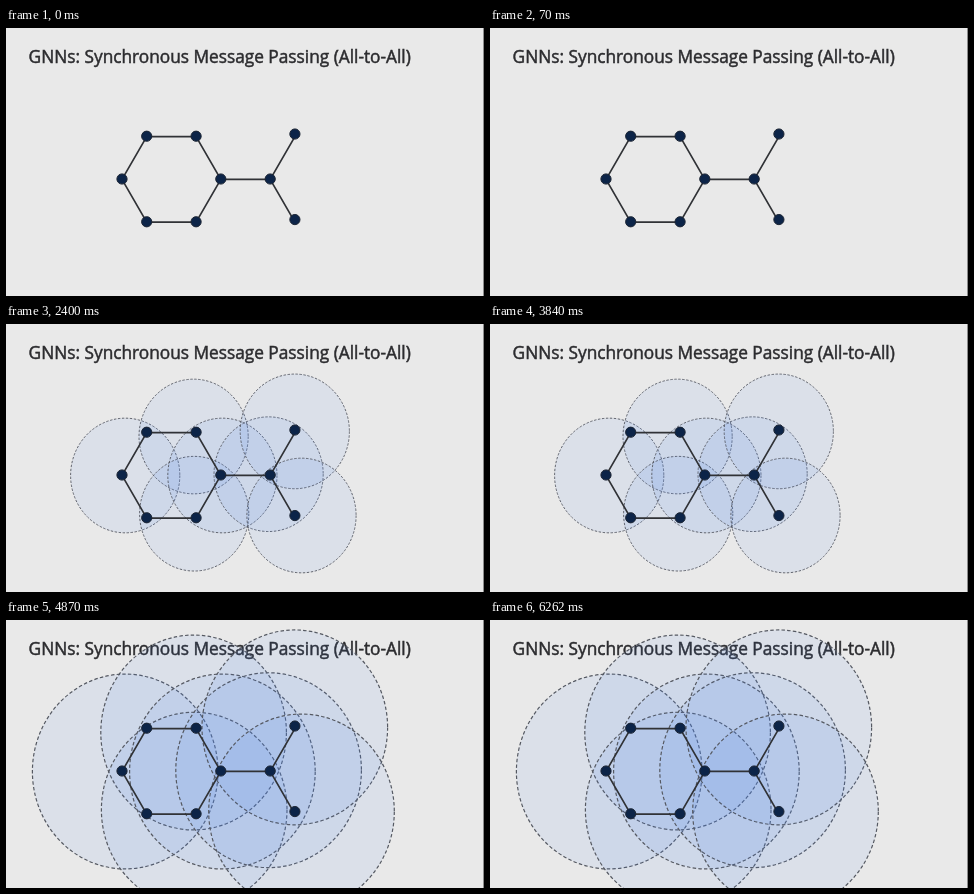
Animation, 478 px wide and 268 px high, one loop 7.19 s. Source, as an HTML page with a canvas:

```html
<!DOCTYPE html>
<html lang="en">
<head>
<meta charset="utf-8">
<title>Synchronous message passing</title>
<style>
  html, body { margin: 0; width: 100%; height: 100%; overflow: hidden; background: #e9e9e9; }
  canvas { display: block; width: 478px; height: 268px; }
</style>
</head>
<body>
<canvas id="stage"></canvas>
<script>
const W = 478, H = 268, LOOP = 7190, ROUND = 2400;
const AXIS = 151.4, BOND = 49.4;
const canvas = document.getElementById('stage');
const ctx = canvas.getContext('2d');
const scale = window.devicePixelRatio || 1;
canvas.width = W * scale;
canvas.height = H * scale;

// Point one bond away from (x, y), in steps of 60 degrees
function step(x, y, turns) {
  const a = turns * Math.PI / 3;
  return { x: x + BOND * Math.cos(a), y: y + BOND * Math.sin(a) };
}

const ring = Array.from({ length: 6 }, (_, i) => step(165.4, AXIS, i));
const hub = step(ring[0].x, AXIS, 0);
const tips = [-1, 1].map(turn => step(hub.x, hub.y, turn));
const bonds = [
  ...ring.map((atom, i) => [atom, ring[(i + 1) % 6]]),
  [ring[0], hub],
  ...tips.map(tip => [hub, tip])
];

// Centres of the message fields
const fields = [
  [119.2, 151.5], [187.6, 112.5], [188.2, 189.7], [216.4, 151.5],
  [262.6, 150.2], [288.8, 107.4], [295.5, 191.5]
];

function drawTitle() {
  const title = 'GNNs: Synchronous Message Passing (All-to-All)';
  ctx.font = '17.25px "Open Sans", "Noto Sans", sans-serif';
  ctx.fillStyle = ctx.strokeStyle = '#2c2c2f';
  ctx.lineWidth = 0.5;
  ctx.fillText(title, 22.6, 34.6);
  ctx.strokeText(title, 22.6, 34.6);
}

// The reach grows by the same amount in every round
function drawFields(round) {
  const reach = 16.4 + 38.2 * round;
  ctx.fillStyle = 'rgba(70, 125, 225, 0.085)';
  ctx.strokeStyle = '#555962';
  ctx.lineWidth = 0.6 + 0.3 * round;
  ctx.setLineDash([1.3 + 1.1 * round, 1 + 0.6 * round]);
  for (const [x, y] of fields) {
    ctx.beginPath();
    ctx.ellipse(x, y, reach, reach * 1.05, 0, 0, Math.PI * 2);
    ctx.fill();
    ctx.stroke();
  }
  ctx.setLineDash([]);
}

function drawAtoms(atoms, lift) {
  for (const { x, y } of atoms) {
    ctx.beginPath();
    ctx.arc(x, y - lift, 5.1, 0, Math.PI * 2);
    ctx.fill();
    ctx.stroke();
  }
}

function drawGraph() {
  ctx.strokeStyle = '#303236';
  ctx.lineWidth = 1.7;
  ctx.beginPath();
  for (const [a, b] of bonds) {
    ctx.moveTo(a.x, a.y);
    ctx.lineTo(b.x, b.y);
  }
  ctx.stroke();

  ctx.fillStyle = '#0c2448';
  ctx.strokeStyle = '#1b2433';
  ctx.lineWidth = 1;
  drawAtoms([...ring, hub], 0.4);
  drawAtoms(tips, 2.6);
}

function render(time) {
  const round = Math.floor((time % LOOP) / ROUND);
  ctx.setTransform(scale, 0, 0, scale, 0, 0);
  ctx.fillStyle = '#e9e9e9';
  ctx.fillRect(0, 0, W, H);
  drawTitle();
  if (round > 0) drawFields(round);
  drawGraph();
  ctx.fillStyle = '#8c8c8c';
  ctx.fillRect(W - 1, 0, 1, H);
}

const begin = performance.now();
function tick() {
  render(performance.now() - begin);
  requestAnimationFrame(tick);
}
tick();
</script>
</body>
</html>
```
